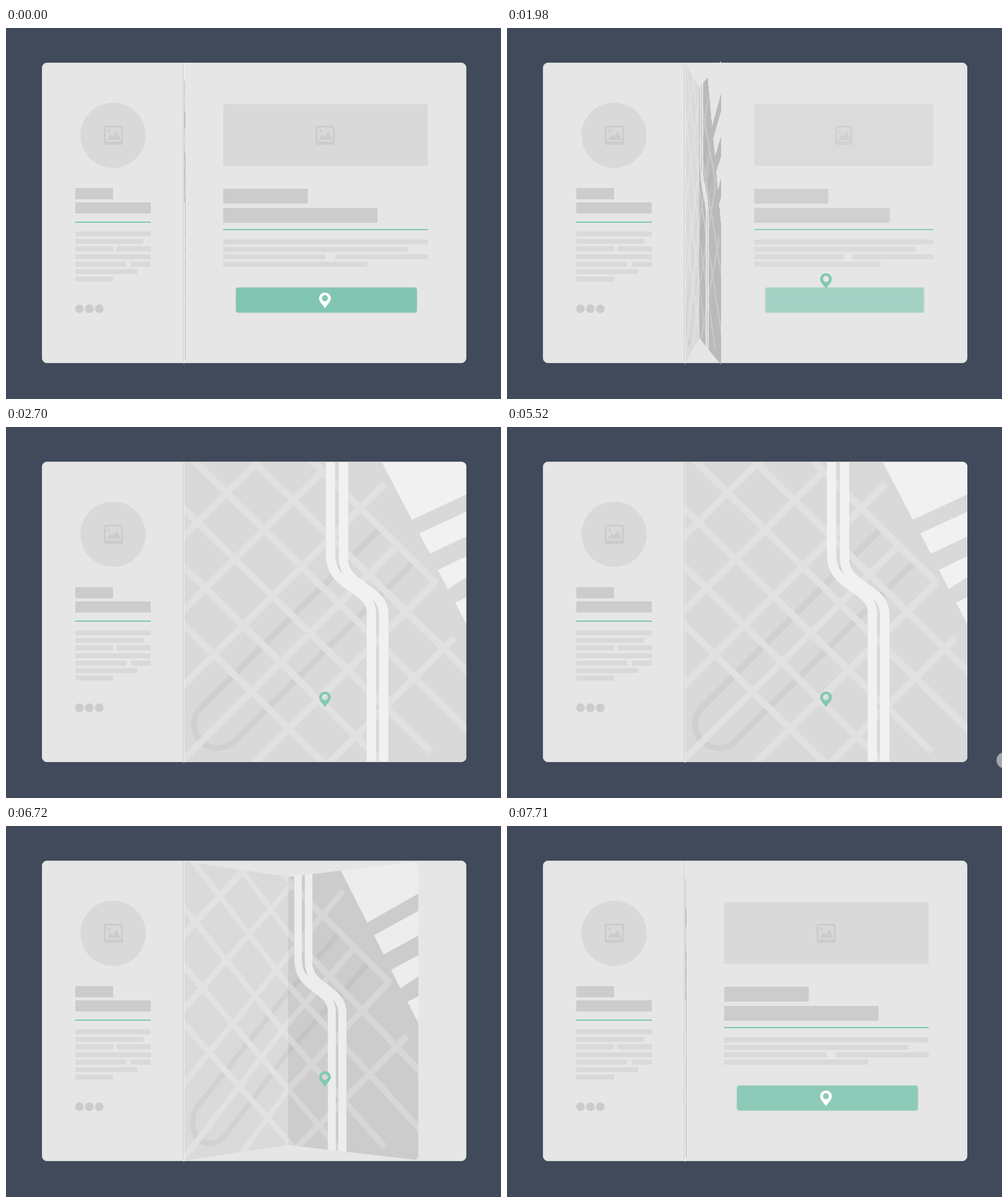
Write an HTML page that moves like this. It is 800x600 px and loops after 9030 ms.

```html
<!DOCTYPE html>
<html lang="en">
<head>
<meta charset="utf-8">
<title>Folding map</title>
<style>
  html, body { margin: 0; width: 100%; height: 100%; overflow: hidden; background: #404a5a; }
  #stage { position: absolute; left: 0; top: 0; width: 800px; height: 600px; overflow: hidden; }
  #stage > svg { position: absolute; left: 0; top: 0; }
  #fold { position: absolute; inset: 0; perspective: 1100px; clip-path: inset(0 0 0 288px); }
  .panel { position: absolute; left: 288px; top: 57px; height: 484px; overflow: hidden;
           transform-origin: 0 50%; backface-visibility: hidden; }
  .panel svg { display: block; }
  #right { border-radius: 0 7px 7px 0; }
  .lane { stroke: var(--lane); stroke-width: 10px; }
  .street { stroke: var(--street); stroke-width: 11px; }
  .river { stroke: var(--white); stroke-width: 15px; }
  .blocks { fill: var(--white); }
</style>
</head>
<body>
<div id="stage">
  <svg width="800" height="600">
    <defs>
      <g id="photo">
        <rect x="158" y="158" width="31" height="31" rx="3" fill="#ccc"/>
        <rect x="161" y="161" width="25" height="22.5" rx="1" fill="#d9d9d9"/>
        <path d="M163 181L169 172L173 176L179 167L185 181Z" fill="#ccc"/>
        <circle cx="166" cy="167" r="2.2" fill="#ccc"/>
      </g>
      <g id="map" fill="none">
        <path class="lane" d="M602 167L315 454A38 38 0 0 0 369 508L657 220"/>
        <path class="street" id="streets"/>
        <path class="river" d="M524.5 50V207C524.5 232 538 245 557 258S590.5 280 590.5 300V550"/>
        <path class="river" d="M545.5 50V213C545.5 232 555 243 575 257S610.5 280 610.5 303V550"/>
        <path class="blocks" d="M607 56H744V109L656 150ZM668 172L744 137V177L685 205ZM698 231L744 209V243L714 262ZM726 284L744 275V319Z"/>
      </g>
    </defs>
    <rect x="58.5" y="56.5" width="685" height="485" rx="7.5" fill="#e6e6e6" stroke="#d2d6d6"/>
    <path d="M286.5 56V542" stroke="#c6c6c6"/>
    <path d="M287.5 56V543" stroke="#f7f7f7"/>
    <circle cx="173" cy="173.5" r="52.7" fill="#d9d9d9"/>
    <use href="#photo"/>
    <g id="side"></g>
    <path d="M118.7 454h.01m15.99 0h.01m15.99 0h.01" stroke="#ccc" stroke-width="14" stroke-linecap="round"/>
    <g id="content">
      <rect x="347" y="123" width="334" height="100" rx="3" fill="#d9d9d9"/>
      <use href="#photo" x="340"/>
      <g id="main"></g>
      <rect id="button" x="367.5" y="419.5" width="296" height="41" rx="4" fill="#82c6b2" stroke="#bdd6cd"/>
    </g>
  </svg>
  <div id="fold">
    <div class="panel" id="left"><svg width="216" height="484" viewBox="288 57 216 484"><use href="#map"/></svg></div>
    <div class="panel" id="right"><svg width="240" height="484" viewBox="504 57 240 484"><use href="#map"/></svg></div>
  </div>
  <svg width="800" height="600">
    <path id="pin" fill-rule="evenodd" d="M515.5 453C511 446.5 506 442.5 506 437.3A9.5 9.5 0 0 1 525 437.3C525 442.5 520 446.5 515.5 453ZM510.6 437A4.9 4.9 0 0 0 520.4 437A4.9 4.9 0 0 0 510.6 437Z"/>
    <circle id="cursor" fill="#e6e6e6"/>
  </svg>
</div>
<script>
const LOOP = 9030, HALF = 4500;
const LEFT = 216, RIGHT = 240;
const $ = id => document.getElementById(id);
const clamp = v => Math.min(1, Math.max(0, v));
const mix = (a, b, k) => a + (b - a) * k;
const span = (t, start, length) => clamp((t - start) / length);
const cos = deg => Math.cos(deg * Math.PI / 180);
const gray = v => `rgb(${v},${v},${v})`;

function bezier(x1, y1, x2, y2) {
  const at = (a, b, u) => 3 * a * u * (1 - u) ** 2 + 3 * b * u * u * (1 - u) + u ** 3;
  return x => {
    let lo = 0, hi = 1;
    for (let i = 0; i < 24; i++) {
      const mid = (lo + hi) / 2;
      if (at(x1, x2, mid) < x) lo = mid; else hi = mid;
    }
    return at(y1, y2, (lo + hi) / 2);
  };
}
const easeInOut = bezier(.42, 0, .58, 1);
const ease = bezier(.25, .1, .25, 1);

// Placeholder text: two title bars, a rule, then rows given as [length, start of a second bar]
function textBlock(id, { x, width, titles, top, size, gap, rule, rows, pitch, body }) {
  const bar = (from, to, y, height, color) => {
    const a = Math.round(x + from * width), b = Math.round(x + to * width);
    $(id).innerHTML += `<rect x="${a}" y="${Math.round(y)}" width="${b - a}" height="${height}" fill="${color}"/>`;
  };
  titles.forEach((length, i) => bar(0, length, top + i * (size + gap), size, '#ccc'));
  bar(0, 1, rule, 2, '#7ec8ae');
  body.forEach(([length, second], i) => {
    bar(0, length, rows + i * pitch, 8, '#d9d9d9');
    if (second) bar(second, 1, rows + i * pitch, 8, '#d9d9d9');
  });
}
textBlock('side', {
  x: 112, width: 122, titles: [.5, 1], top: 259, size: 18, gap: 5, rule: 313, rows: 329, pitch: 12.2,
  body: [[1], [.9], [.5, .55], [1], [.67, .74], [.82], [.5]]
});
textBlock('main', {
  x: 347, width: 334, titles: [.413, .754], top: 260, size: 24, gap: 7, rule: 325, rows: 342, pitch: 12,
  body: [[1], [.9], [.5, .548], [.705]]
});

// Two families of evenly spaced streets; the numbers are where each one ends
const falling = [696, 750, 750, 686, 750, 750].map((end, i) => {
  const y = x => -149 + 94 * i + .985 * (x - 288);
  return `M280 ${y(280)}L${end} ${y(end)}`;
});
const rising = [412, 515, 612, 633, 694, 725].map((end, i) => {
  const sum = 463 + 120.5 * i;
  return `M280 ${sum - 280}L${end} ${sum - end}`;
});
$('streets').setAttribute('d', falling.concat(rising).join(''));

function shade(id, v) {
  const style = $(id).style;
  style.background = gray(v);
  style.setProperty('--lane', gray(v * .957));
  style.setProperty('--street', gray(mix(v, 255, .21)));
  style.setProperty('--white', gray(mix(v, 255, .64)));
}

function drawFold(t) {
  const open = t < HALF ? easeInOut(span(t, 1806, 900)) : 1 - easeInOut(span(t, 6336, 900));
  const a = 96 * (1 - open), b = a * .87;
  $('fold').style.display = open > 0 ? 'block' : 'none';
  $('left').style.transform = `rotateY(${a}deg)`;
  $('right').style.transform = `rotateY(${a}deg) translateX(${LEFT}px) rotateY(${-a - b}deg)`;
  shade('left', 217 + Math.min(1, a / 35));
  shade('right', 217 - a * .35);

  const width = (LEFT * cos(a) + RIGHT * cos(b)) / (LEFT + RIGHT);
  const squeeze = open > 0 ? clamp(1 - width * 1.024) : 1;
  $('content').setAttribute('transform', `translate(${744 * (1 - squeeze)} 0) scale(${squeeze} 1)`);
  $('content').setAttribute('opacity', clamp((a - 51) / 45));
  $('button').setAttribute('opacity', (t < HALF ? 1 : .87) * (1 - span(open, 0, .38)));
}

function drawPin(t) {
  const start = t < HALF ? 1365 : 6375, drop = t < HALF ? 2460 : 7020;
  const lift = ease(span(t, start, 225)) - easeInOut(span(t, drop, 240));
  const green = ease(span(t, 1365, 270)) - ease(span(t, 7395, 315));
  const [r, g, b] = [130, 201, 177].map(c => mix(255, c, green));
  $('pin').setAttribute('fill', `rgb(${r},${g},${b})`);
  $('pin').setAttribute('transform', `translate(0 ${-31.3 * lift})`);
}

function drawCursor(t) {
  const local = t < HALF ? t : t - 5070;
  const move = easeInOut(span(local, 390, 420));
  const press = ease(span(local, 840, 270));
  const cursor = $('cursor');
  cursor.setAttribute('cx', mix(816, 534, move));
  cursor.setAttribute('cy', mix(543.5, 438, move));
  cursor.setAttribute('r', mix(13, 23, press));
  cursor.setAttribute('opacity', local >= 450 && local < 1380 ? mix(.6, .1, press) : 0);
}

function frame() {
  const t = performance.now() % LOOP;
  drawFold(t);
  drawPin(t);
  drawCursor(t);
  requestAnimationFrame(frame);
}
frame();
</script>
</body>
</html>
```
